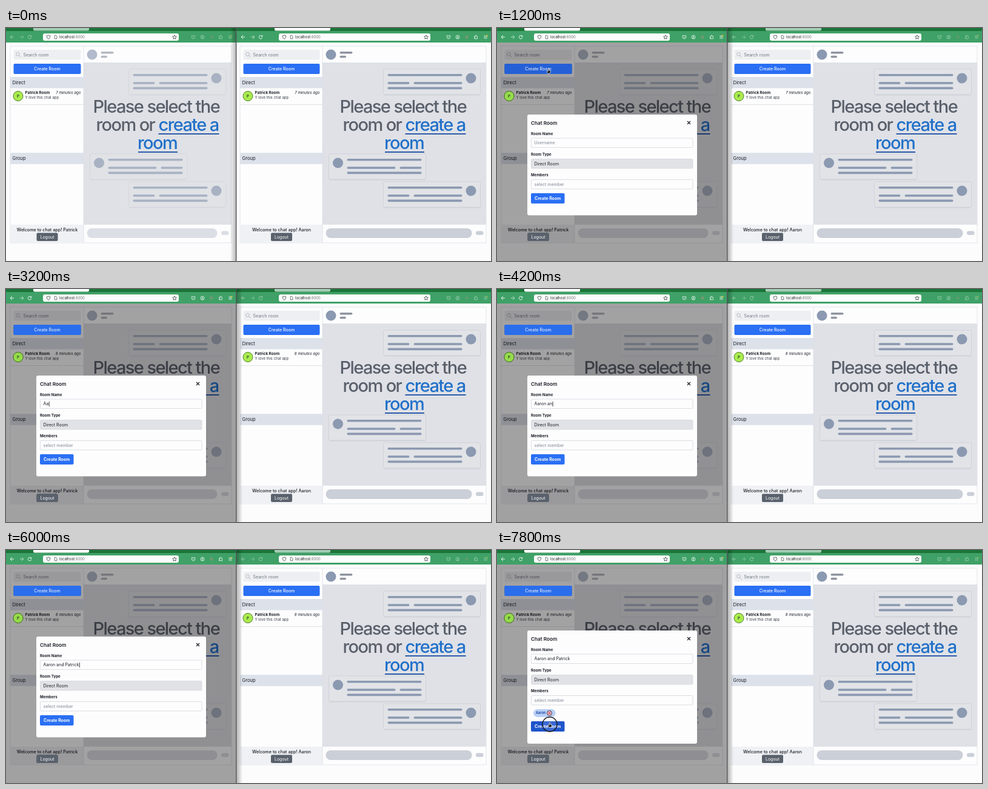
These frames come from a looping animation (800 by 385 pixels, 8 s). An HTML page:

```html
<!DOCTYPE html>
<html lang="en">
<head>
<meta charset="utf-8">
<title>Chat rooms</title>
<style>
  html, body { margin: 0; width: 100%; height: 100%; overflow: hidden; background: #fcfcfd; }
  svg { display: block; width: 800px; height: 385px; font-family: Inter, "Open Sans", sans-serif; }
  text { white-space: pre; }
</style>
</head>
<body>
<svg id="stage" viewBox="0 0 800 385"></svg>
<script>
const LOOP = 8000, STEP = 200;
const LEFT_USER = 'Patrick', RIGHT_USER = 'Aaron';
const ROOM_NAME = `${RIGHT_USER} and ${LEFT_USER}`;
const BLUE = '#2a6ff4', INK = '#1b1e26', SLATE = '#8b99b1';
const stage = document.getElementById('stage');
const measure = document.createElement('canvas').getContext('2d');

const rect = (x, y, w, h, fill, r = 0, extra = '') =>
  `<rect x="${x}" y="${y}" width="${w}" height="${h}" rx="${r}" fill="${fill}" ${extra}/>`;
const circle = (x, y, r, fill, extra = '') =>
  `<circle cx="${x}" cy="${y}" r="${r}" fill="${fill}" ${extra}/>`;
const path = (d, stroke, width = 1, fill = 'none', extra = '') =>
  `<path d="${d}" stroke="${stroke}" stroke-width="${width}" fill="${fill}" ${extra}/>`;
const text = (x, y, size, str, fill = INK, extra = '') =>
  `<text x="${x}" y="${y}" font-size="${size}" fill="${fill}" ${extra}>${str}</text>`;
const at = (x, y, body) => `<g transform="translate(${x} ${y})">${body}</g>`;
const fade = (opacity, body) => `<g opacity="${opacity}">${body}</g>`;
const MID = 'text-anchor="middle"', BOLD = 'font-weight="700"', MEDIUM = 'font-weight="500"';

const shadowFill = `<linearGradient id="shadow">
  <stop offset="0" stop-opacity=".3"/><stop offset="1" stop-opacity="0"/></linearGradient>`;

// Two window layouts that differ only in where their columns fall.
const windows = [
  { x: 0, app: 7, main: 128, end: 372, urlX: 61, urlEnd: 285, tools: 309, tab: 45, nav: 10, title: 250.5, user: LEFT_USER, strength: .65 },
  { x: 380, app: 386, main: 522, end: 792, urlX: 450, urlEnd: 700, tools: 730, tab: 443, nav: 391, title: 657.5, user: RIGHT_USER, strength: 1 },
];

function toolbar(w, active) {
  const { nav, urlX, urlEnd, tools } = w;
  const ink = '#e8f7ee', dark = '#39453e';
  const arrow = 'M3 0H-3M0 -3L-3 0L0 3';
  const star = 'M0 -3.4L1 -1.1L3.4 -.9L1.6 .8L2.1 3.2L0 1.9L-2.1 3.2L-1.6 .8L-3.4 -.9L-1 -1.1Z';
  const icons = at(nav, 15, path(arrow, ink))
    + at(nav + 16, 15, path(arrow, '#b5dcc4', 1, 'none', 'transform="scale(-1 1)"'))
    + at(nav + 29, 15, path('M2.4 -1.5A2.8 2.8 0 1 0 2.8 .8M2.8 -3V-.8H.7', ink))
    + at(tools, 15, path('M-2.8 -2.4H2.8V0A2.8 2.8 0 0 1 -2.8 0ZM-1.3 -.5L0 .8L1.3 -.5', ink, .8))
    + at(tools + 15, 15, circle(0, 0, 3, 'none', `stroke="${ink}" stroke-width=".8"`)
      + circle(0, -.8, 1, ink) + path('M-1.8 1.8Q0 .2 1.8 1.8', ink, .8))
    + circle(tools + 30, 15, 2.8, '#6f9a6d')
    + at(tools + 45, 15, path('M-2.5 -1.3H-.8V-2.8H.8V-1.3H2.6V2.7H-2.5V1.5H-1.2V.2H-2.5Z', ink, .8))
    + at(tools + 61, 15, path('M-2.7 -2H2.7M-2.7 0H2.7M-2.7 2H2.7', ink, .8) + circle(2.2, -2.2, 1.3, '#e5c34a'));
  return rect(w.x, 0, 420, 24, '#3fa167')
    + rect(w.x, 0, 420, 5, '#1b7438')
    + rect(w.tab, -3, 92, 7.5, active ? '#fdfefd' : '#a3cdb3', 2)
    + fade(active ? 1 : .5, icons)
    + rect(urlX, 9, urlEnd - urlX, 12, '#fbfdfc', 3)
    + at(urlX + 9, 15, path('M0 -3.2L2.7 -2.2C2.7 .5 2 2.2 0 3.3C-2 2.2 -2.7 .5 -2.7 -2.2Z', dark, .8))
    + at(urlX + 21, 15, path('M-1.8 -2.8H.6L1.8 -1.5V2.8H-1.8Z', dark, .7))
    + text(urlX + 27, 17.2, 5.9, 'localhost<tspan fill="#777">:8000</tspan>', '#222')
    + at(urlEnd - 7, 15, path(star, dark, .8));
}

const createButton = (w, fill, ink = '#fff') =>
  rect(w.app + 5.5, 59, w.main - w.app - 10, 17, fill, 2)
  + text((w.app + w.main) / 2 + .5, 70, 7, 'Create Room', ink, `${MID} ${MEDIUM}`);

const avatar = (w, fill) =>
  circle(w.app + 13, 112.5, 8, fill, 'stroke="#52792a" stroke-width="1"')
  + text(w.app + 13, 114.9, 6.2, LEFT_USER[0], '#31501c', `${MID} ${BOLD}`);

function logoutButton(w) {
  const mid = (w.app + w.main) / 2 + .5;
  return rect(mid - 17.5, 338.5, 35, 13.5, '#59616c', 2) + text(mid, 347.8, 7, 'Logout', '#fff', MID);
}

function sidebar(w, minutes) {
  const { app, main } = w, width = main - app;
  const section = (y, label) => rect(app, y, width, 18.5, '#dce1ea') + text(app + 3.5, y + 12, 7.6, label);
  return rect(app + 5.5, 36, width - 10, 16.5, '#eeeff2', 2)
    + circle(app + 12.5, 43.3, 2.8, 'none', 'stroke="#a4a9b2" stroke-width=".8"')
    + path(`M${app + 14.6} 45.4l3 3`, '#a4a9b2', .8)
    + text(app + 21.5, 46.6, 7, 'Search room', '#6f7683')
    + createButton(w, BLUE)
    + section(81, 'Direct') + section(206.3, 'Group')
    + avatar(w, '#a9ec4f')
    + text(app + 24.5, 108.8, 6.3, `${LEFT_USER} Room`, INK, BOLD)
    + text(main - 4.5, 108.8, 6.2, `${minutes} minutes ago`, INK, 'text-anchor="end" font-style="italic"')
    + text(app + 24.5, 117.4, 6, 'Y love this chat app', '#3b404a')
    + rect(app, 126, width, .8, '#d9dbe1')
    + rect(app, 325, width, 30, '#eff1f4')
    + text((app + main) / 2 + .5, 335.6, 7.2, `Welcome to chat app! ${w.user}`, INK, `${MID} ${MEDIUM}`)
    + logoutButton(w);
}

function messageCard(x, y, mine) {
  const bar = (bx, by, width) => rect(bx, by, width, 3.6, SLATE, 1.8);
  const bx = mine ? 7 : 30, split = mine ? 36 : 80;
  return at(x, y, rect(0, 0, 160, 42, '#e1e3e7', 2, 'stroke="#cfd2d8" stroke-width="1"')
    + path('M1 42.8H159', '#c8cbd2', .8)
    + circle(mine ? 144.5 : 15, 15, 8.5, SLATE)
    + bar(bx, 8, 123) + bar(bx, 21.2, split) + bar(bx + split + 7, 21.2, 116 - split) + bar(bx, 29.6, 123));
}

function mainPane(w) {
  const { main, end, title } = w;
  const style = `letter-spacing="-1.6" ${MEDIUM}`;
  const head = (x, y, str, fill = '#5a606b') => text(x, y, 29, str, fill, style);
  const link = '#2170c9', line = '#2a5aaa';
  const skeleton = circle(main + 14, 44, 8.5, SLATE)
    + rect(main + 28.5, 39, 21, 3.4, '#8f959f', 1.7) + rect(main + 28.5, 45.8, 10.5, 3.4, '#8f959f', 1.7)
    + rect(main + 5.5, 331, end - main - 29, 16, '#cbcfd8', 8)
    + rect(end - 17, 335.5, 12.5, 6.5, '#cbcfd8', 3.2)
    + messageCard(end - 169.5, 68, true) + messageCard(main + 10.5, 208, false) + messageCard(end - 169.5, 254, true);
  return rect(main, 57, end - main, 268, '#dfe1e6')
    + fade(w.strength, skeleton)
    + head(title - 107, 140.2, 'Please select the')
    + head(title - 102, 170.2, 'room or') + head(title + 1, 170.2, 'create a', link)
    + head(title - 33.5, 200.2, 'room', link)
    + rect(title + 1, 174, 100, 2, line) + rect(title - 32.5, 204, 65, 2, line);
}

function chatWindow(w, active, minutes) {
  return rect(w.x, 0, 420, 385, '#fcfcfd') + toolbar(w, active)
    + rect(w.app, 30, w.end - w.app, 325, '#fdfdfe', 0, 'stroke="#e3e5ea" stroke-width="1"')
    + mainPane(w) + sidebar(w, minutes)
    + rect(w.main - .4, 30, .8, 325, '#dcdfe5');
}

function field(y, label, value, placeholder, caret, fill = '#fdfdfe') {
  measure.font = '7px Inter, "Open Sans", sans-serif';
  const caretX = 62 + measure.measureText(value).width;
  return text(56, y, 6.2, label, INK, BOLD)
    + rect(56.5, y + 5.5, 266.5, 15.5, fill, 1.5, 'stroke="#d8dae0" stroke-width=".9"')
    + text(61.5, y + 15.6, 7, value || placeholder, value ? INK : '#7d8490')
    + (caret ? rect(caretX, y + 9.5, .8, 8, '#111') : '');
}

function modal(t) {
  const chosen = t >= 7400, lift = chosen ? 10 : 0;
  const typed = ROOM_NAME.slice(0, Math.max(0, Math.floor((t - 2880) / 153)));
  const buttonY = chosen ? 293 : 273;
  const chip = rect(60, 273, 36.5, 13, '#b9d0f6', 6.5)
    + text(64, 281.4, 5.5, RIGHT_USER, '#2450a8', BOLD)
    + circle(86.5, 279.5, 4, '#e9b7c0', 'stroke="#43394a" stroke-width="1"')
    + path('M85 278l3 3m0 -3l-3 3', '#b32336', .9);
  return at(0, -lift, rect(50, 143, 280, chosen ? 187 : 166.5, '#fdfdfe', 3)
    + text(56, 159.8, 8.2, 'Chat Room', INK, 'font-weight="600"')
    + path('M314 154l5 5m0 -5l-5 5', INK, 1.2)
    + field(176.5, 'Room Name', typed, 'Username', t >= 1800 && t < 6400)
    + field(211, 'Room Type', 'Direct Room', '', false, '#e1e2e6')
    + field(245, 'Members', '', 'select member', t >= 6400 && t < 7400)
    + (chosen ? chip : '')
    + rect(56, buttonY, 55.5, 17, t >= 7600 ? '#1f55cb' : BLUE, 2)
    + text(83.7, buttonY + 10.8, 6.9, 'Create Room', '#fff', `${MID} ${BOLD}`));
}

// Pointer stops: time, x, y; the pointer eases from each stop to the next.
const pointerRuns = [
  [[600, 210, 115], [1000, 85, 70], [1200, 85, 70], [1800, 119.5, 190], [2400, 119.5, 190]],
  [[6200, 119.5, 190], [6400, 115.5, 261.5], [7000, 115.5, 261.5], [7600, 87, 288], [8000, 87, 288]],
];

function pointer(t) {
  const run = pointerRuns.find(r => t >= r[0][0] && t <= r[r.length - 1][0]);
  if (!run) return '';
  const i = Math.max(1, run.findIndex(stop => stop[0] >= t));
  const [t0, x0, y0] = run[i - 1], [t1, x1, y1] = run[i];
  const p = (t - t0) / (t1 - t0), k = p * p * (3 - 2 * p);
  const x = x0 + (x1 - x0) * k, y = y0 + (y1 - y0) * k;
  const overInput = (t >= 1800 && t <= 2400) || (t >= 6200 && t <= 7000);
  const overButton = (t >= 1000 && t <= 1200) || t >= 7600;
  const shape = overInput
    ? path('M-1.6 -3.5Q0 -3.5 0 -2.5Q0 -3.5 1.6 -3.5M0 -2.5V2.5M-1.6 3.5Q0 3.5 0 2.5Q0 3.5 1.6 3.5', '#111', .9)
    : overButton
      ? path('M-.8 -2.5Q0 -3.6 .8 -2.5V0L3.2 .8Q3.6 3 2.2 5H-1.3L-3.2 1.8Q-2.6 .6 -.8 1.8Z', '#fff', .7, '#111')
      : path('M0 0V8L2 6.2L3.3 9L4.5 8.4L3.2 5.8H5.8Z', '#fff', .7, '#111');
  const ring = t >= 7600 ? circle(0, 0, 12, 'rgba(255,255,255,.12)', 'stroke="#111" stroke-width="1.3"') : '';
  return at(x, y, ring + shape);
}

// The focused window casts its shadow onto the other one.
function divider(leftActive) {
  const flip = leftActive ? '' : 'transform="translate(760 0) scale(-1 1)"';
  return rect(380, 0, 10, 385, 'url(#shadow)', 0, flip) + rect(379, 0, 1.4, 385, '#55585b');
}

function scene(t) {
  const [left, right] = windows;
  const leftActive = t >= 400, open = t >= 1000;
  const minutes = t < 2600 ? 7 : 8;
  const dimmed = rect(0, 24, 380, 361, 'rgba(4,0,2,.36)')
    + createButton(left, t <= 1200 ? '#2560d6' : '#2b6eec', '#e2eafa')
    + avatar(left, '#95dc4c') + logoutButton(left) + modal(t);
  return shadowFill
    + chatWindow(left, leftActive, minutes)
    + (open ? dimmed : '')
    + chatWindow(right, !leftActive, minutes)
    + divider(leftActive)
    + pointer(t);
}

let shown = -1;
function frame() {
  const t = Math.floor(performance.now() % LOOP / STEP) * STEP;
  if (t !== shown) stage.innerHTML = scene(shown = t);
  requestAnimationFrame(frame);
}
frame();
</script>
</body>
</html>
```
